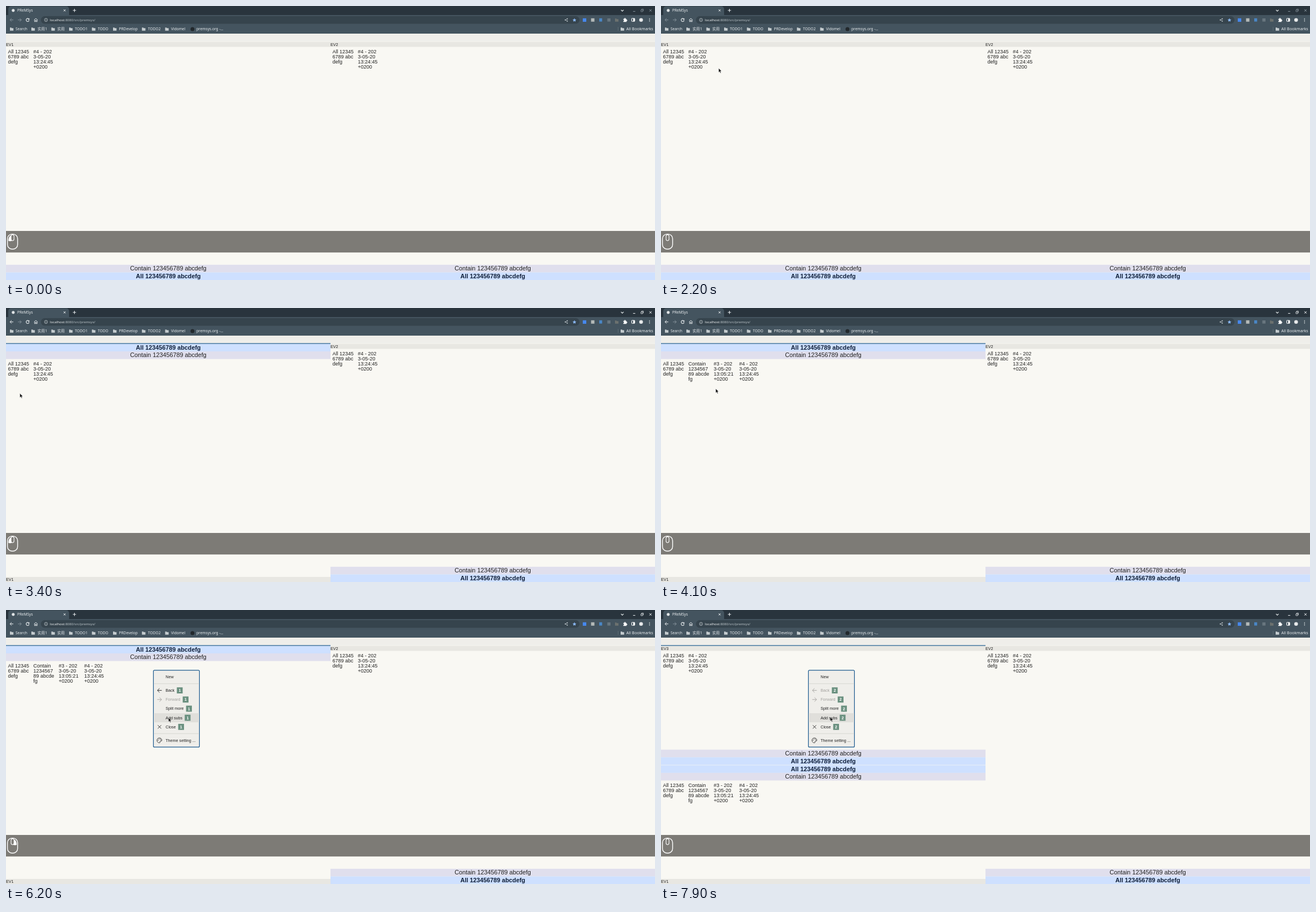
Write an HTML page with a canvas that moves like this. It is 1152 px wide and 486 px high and loops after 8000 ms.

```html
<!DOCTYPE html>
<html lang="en">
<head>
<meta charset="utf-8">
<title>PReMSys</title>
<style>
html, body { margin: 0; width: 100%; height: 100%; overflow: hidden; background: #f9f8f3; }
canvas { display: block; width: 100%; height: 100%; }
</style>
</head>
<body>
<canvas id="stage" width="1152" height="486"></canvas>
<script>
const ctx = document.getElementById('stage').getContext('2d');
const LOOP = 8000, STEP = 100;
const PAGE = '"Liberation Sans", Arial, sans-serif';
const UI = '"Noto Sans", "Noto Sans CJK SC", sans-serif';
const INK = '#222222', BLUE = '#1d5b8f', LIGHT = '#e9edef', DIM = '#84919a';

// Moments at which the state changes.
const AT = { release: 700, grab: 2800, open: 3200, load: 3900, rest: 4100,
  menu: 5200, menuRest: 6500, add: 6800, addRest: 7500 };

// Pointer path: time, x, y
const PATH = [
  [100, 1108, 7], [600, 620, 42], [1100, 328.7, 71.8], [1900, 150, 104],
  [2700, 23, 121], [2800, 23, 119], [2900, 23, 108.5], [3100, 23, 100],
  [3400, 24.7, 151.5], [3900, 40, 150], [4600, 240, 126], [5000, 266.7, 122],
  [5200, 261.5, 107], [5400, 263, 112], [6200, 288.5, 191], [6800, 289, 190.5],
  [7400, 294, 190], [7900, 300.3, 189.8]
];

const ITEMS = {
  all: ['All 12345', '6789 abc', 'defg'],
  contain: ['Contain', '1234567', '89 abcde', 'fg'],
  third: ['#3 - 202', '3-05-20', '13:05:21', '+0200'],
  fourth: ['#4 - 202', '3-05-20', '13:24:45', '+0200']
};
const SHORT = [ITEMS.all, ITEMS.fourth];
const LONG = [ITEMS.all, ITEMS.contain, ITEMS.third, ITEMS.fourth];

function rect(x, y, w, h, color) {
  ctx.fillStyle = color;
  ctx.fillRect(x, y, w, h);
}

function round(x, y, w, h, r, fill, stroke, width = 1) {
  ctx.beginPath();
  ctx.roundRect(x, y, w, h, r);
  if (fill) { ctx.fillStyle = fill; ctx.fill(); }
  if (stroke) { ctx.strokeStyle = stroke; ctx.lineWidth = width; ctx.stroke(); }
}

function disc(x, y, r, fill, stroke, width = 1) {
  round(x - r, y - r, 2 * r, 2 * r, r, fill, stroke, width);
}

function text(str, x, y, size, color = INK, font = PAGE, weight = 400, align = 'left') {
  ctx.font = `${weight} ${size}px ${font}`;
  ctx.textAlign = align;
  ctx.fillStyle = color;
  ctx.fillText(str, x, y);
}

// d uses coordinates relative to (x, y).
function path(d, x, y, { fill, stroke, width = 1 }) {
  const p = new Path2D(d);
  ctx.save();
  ctx.translate(x, y);
  if (fill) { ctx.fillStyle = fill; ctx.fill(p); }
  if (stroke) { ctx.strokeStyle = stroke; ctx.lineWidth = width; ctx.stroke(p); }
  ctx.restore();
}

function pointer(t) {
  const i = PATH.findIndex(p => p[0] >= t);
  if (i < 0) return PATH[PATH.length - 1].slice(1);
  if (i === 0) return PATH[0].slice(1);
  const [t0, x0, y0] = PATH[i - 1], [t1, x1, y1] = PATH[i];
  const k = (t - t0) / (t1 - t0);
  return [x0 + (x1 - x0) * k, y0 + (y1 - y0) * k];
}

function folder(x, y, color) {
  path('M0 -2.4 h2.4 l.8 .9 h3 v4.5 h-6.2z', x, y, { fill: color });
}

function drawBrowser(focused) {
  const nav = focused ? LIGHT : DIM;
  rect(0, 0, 1152, 17, '#29343d');
  rect(0, 16, 1152, 33, '#44545f');
  round(4, 0.5, 108, 18, [5, 5, 0, 0], '#44545f');

  disc(12.8, 7.8, 2.6, '#dfe3e5');
  text('PReMSys', 20, 10, 6.5, LIGHT, UI);
  path('M-1.7 -1.7 L1.7 1.7 M1.7 -1.7 L-1.7 1.7', 104, 7.8, { stroke: LIGHT });
  path('M-2.8 0 H2.8 M0 -2.8 V2.8', 121.5, 7.8, { stroke: LIGHT });
  path('M-2.3 -1.2 L0 1.2 L2.3 -1.2', 1094, 8, { stroke: LIGHT, width: 1.2 });
  path('M-2 2 H2', 1115, 7.6, { stroke: nav });
  path('M-2 -.6 h3.2 v3 h-3.2z M-.8 -.8 v-1.3 h3.2 v3 h-1', 1129, 7.6, { stroke: nav, width: .8 });
  path('M-2 -2 L2 2 M2 -2 L-2 2', 1144, 7.8, { stroke: nav });

  const arrow = 'M3 0 H-2.8 M0 -2.9 L-2.9 0 L0 2.9';
  path(arrow, 10, 24.7, { stroke: nav });
  path('M-3 0 H2.8 M0 -2.9 L2.9 0 L0 2.9', 24.3, 24.7, { stroke: DIM });
  path('M2.1 -1.7 A2.7 2.7 0 1 0 2.6 .7', 38.5, 24.8, { stroke: LIGHT, width: 1.1 });
  path('M3 -3.2 V-.3 H.2z', 38.5, 24.8, { fill: LIGHT });
  path('M-3.2 0 L0 -2.8 L3.2 0 M-2.2 -.5 V3 H-.8 V.8 H.8 V3 H2.2 V-.5', 53, 24.8, { stroke: LIGHT, width: .9 });

  round(62, 18, 956, 13.4, 6.7, '#36444d');
  disc(71, 24.7, 2.8, null, '#c2cace', .8);
  rect(70.6, 24.3, .8, 2, '#c2cace');
  rect(70.6, 22.9, .8, .8, '#c2cace');
  text('localhost', 78, 27, 6.1, '#eef1f2', UI);
  const host = ctx.measureText('localhost').width;
  text(':8080/src/premsys/', 78 + host, 27, 6.1, '#b9c2c7', UI);

  path('M1.8 -2 L-1.8 0 L1.8 2', 994.5, 24.7, { stroke: '#c2cace', width: .7 });
  [[996.3, 22.7], [992.7, 24.7], [996.3, 26.7]].forEach(([x, y]) => disc(x, y, 1, '#c2cace'));
  path('M0 -3.4 L1 -1.1 3.4 -.9 1.6 .7 2.1 3.1 0 1.8 -2.1 3.1 -1.6 .7 -3.4 -.9 -1 -1.1z',
    1009, 24.8, { fill: '#8ab8f5' });

  rect(1023.8, 21.8, 6.2, 6.2, '#4688ee');
  rect(1038.5, 21.8, 6, 6, '#b4b9b8');
  rect(1053, 21.8, 5.2, 5.8, '#4a86c5');
  rect(1067.4, 22, 5.6, 5.6, '#68767f');
  folder(1081, 24.7, '#6c716f');
  path('M-3 -1.8 h1.8 a1.1 1.1 0 1 1 2.1 0 h1.7 v1.7 a1.1 1.1 0 1 1 0 2.1 v1.6 h-5.6 v-1.8 a1 1 0 1 0 0 -1.9z',
    1098.8, 24.6, { fill: '#fff' });
  round(1110.5, 22, 5.5, 5.2, .5, null, '#fff', 1);
  rect(1113.3, 22, 2.7, 5.2, '#fff');
  disc(1127.3, 24.7, 3.3, '#e7e9ea');
  [-2.3, 0, 2.3].forEach(dy => disc(1142.3, 24.7 + dy, .75, LIGHT));

  const marks = [[7, 17, 'Search'], [45, 56, '实用1'], [80.5, 91, '实用'], [112, 122.3, 'TODO1'],
    [152.5, 163, 'TODO'], [190, 200.5, 'PRDevelop'], [241.3, 252, 'TODO2'], [282.5, 293, 'Vidomel']];
  for (const [fx, tx, name] of marks) {
    folder(fx, 40.7, '#c5cccf');
    text(name, tx, 43, 6.6, LIGHT, UI);
  }
  disc(331, 41, 3.5, '#22282c');
  text('premsys.org -…', 338, 43, 6.6, LIGHT, UI);
  rect(1086, 37, .7, 7, '#65737c');
  folder(1091, 40.7, '#c5cccf');
  text('All Bookmarks', 1101, 43, 7.1, LIGHT, UI);
}

function header(name, x, y) {
  rect(x, y, 576, 9, '#e8e7e2');
  text(name, x, y + 7.1, 7.2);
}

function row(kind, x, y) {
  const all = kind === 'All';
  rect(x, y, 576, 13.5, all ? '#cee0ff' : '#e0dfed');
  text(`${kind} 123456789 abcdefg`, x + 288, y + 10.4, 10.8, all ? '#10203a' : INK, PAGE, all ? 700 : 400, 'center');
}

function item(lines, x, y) {
  lines.forEach((line, i) => text(line, x + 3.5, y + 11.5 + i * 9, 9));
}

function list(items, x, y) {
  items.forEach((lines, i) => item(lines, x + i * 45.05, y));
}

// A view closed by its two ancestors at the bottom.
function view(name, x, bottom, items) {
  header(name, x, 63.5);
  list(items, x, 72.3);
  row('Contain', x, bottom - 27);
  row('All', x, bottom - 13.5);
}

// A view whose ancestors are stacked at the top.
function opened(y, items) {
  row('All', 0, y);
  row('Contain', 0, y + 13.5);
  list(items, 0, y + 27);
  header('EV1', 0, 477);
}

function drawPage(t, py) {
  rect(0, 49, 1152, 437, '#f9f8f3');
  rect(0, 49, 1152, 13.6, '#efeeea');
  view('EV2', 576, 486, SHORT);

  if (t < AT.grab) {
    view('EV1', 0, 486, SHORT);
  } else if (t < AT.open) {
    view('EV1', 0, 486, []);
    const y = 72.3 + py - 121.8;
    rect(0, Math.max(y, 63.5), 45, y + 58.8 - Math.max(y, 63.5), 'rgba(225,224,220,.6)');
    item(ITEMS.all, 0, y);
    item(ITEMS.fourth, 45.05, 72.3);
  } else if (t < AT.add) {
    opened(63.5, t < AT.load ? SHORT : LONG);
  } else {
    view('EV3', 0, 274.7, SHORT);
    opened(275.4, LONG);
  }
  if (t >= AT.grab) rect(0, 62.4, 576, 1.2, BLUE);
}

function drawMouse(t) {
  rect(0, 399, 1152, 38.2, '#7d7b76');
  const left = t < AT.release || (t >= AT.grab && t < AT.rest) || (t >= AT.add && t < AT.addRest);
  const right = t >= AT.menu && t < AT.menuRest;
  round(2.6, 404.6, 18, 26.6, 8, null, '#fff', 1.4);
  if (left || right) {
    ctx.save();
    ctx.translate(11.6, 0);
    if (right) ctx.scale(-1, 1);
    path('M-2.6 -5 Q-7.2 -3 -7.4 4.8 Q-4.6 6 -1.2 4.8 Q-3.4 2 -2.6 -5z', 0, 411.8, { fill: '#fff' });
    ctx.restore();
  }
  round(9, 405.6, 5.2, 10.6, 2.6, left || right ? '#7d7b76' : null, '#fff', 1.1);
}

function drawMenu(t, py) {
  const count = t < AT.add ? 1 : 2;
  round(261.6, 106.8, 81.8, 136.4, 2, '#efeeea', BLUE, 1.2);
  rect(262.2, 130.4, 80.6, .8, '#d2d1cd');
  rect(262.2, 218.8, 80.6, .8, '#d2d1cd');

  const back = 'M4 0 H-3.6 M0 -3.6 L-3.7 0 L0 3.6';
  const forward = 'M-4 0 H3.6 M0 -3.6 L3.7 0 L0 3.6';
  const cross = 'M-3 -3 L3 3 M3 -3 L-3 3';
  const entries = [
    ['New', 118.6], ['Back', 142.6, back, count === 2], ['Forward', 158.8, forward, true],
    ['Split more', 175], ['Add subs', 191.1], ['Close', 207.3, cross], ['Theme setting ...', 231.2]
  ];
  entries.forEach(([name, y, icon, off], i) => {
    const color = off ? '#a3a29f' : INK;
    if (Math.abs(py - y) < 8.1 && !off) rect(262.2, y - 8.1, 80.6, 16.2, '#e0dfdb');
    if (icon) path(icon, 272.5, y, { stroke: color, width: .9 });
    text(name, 283.2, y + 2.4, 7.2, color);
    if (i > 0 && i < 6) {
      const x = 283.2 + ctx.measureText(name).width + 4.1;
      rect(x, y - 5.4, 10.3, 10.8, '#6b9180');
      text(count, x + 5.15, y + 2.5, 7.2, '#fff', PAGE, 700, 'center');
    }
  });
  path('M.6 4.4 A4.4 4.4 0 1 1 4.4 -.3 Q4.3 1.6 2.4 1.5 Q.5 1.3 .9 2.6 Q1.6 4.2 .6 4.4z',
    272.3, 231.2, { stroke: INK, width: .8 });
  [[-2.4, .2], [-1.5, -2.1], [1, -2.5], [2.5, -.7]].forEach(([x, y]) => disc(272.3 + x, 231.2 + y, .65, INK));
}

function drawPointer(t, x, y) {
  if (t < 100) return;
  if (t >= AT.grab && t < AT.open) {
    const style = { stroke: '#fff', width: 2 };
    const arms = 'M-3.4 0 H3.4 M0 -3.4 V3.4';
    path(arms, x, y, style);
    path(arms, x, y, { stroke: INK, width: .9 });
    for (let i = 0; i < 4; i++) {
      ctx.save();
      ctx.translate(x, y);
      ctx.rotate(i * Math.PI / 2);
      path('M0 -4.4 L1.7 -2.3 H-1.7z', 0, 0, { fill: INK });
      ctx.restore();
    }
    return;
  }
  path('M0 0 V7.3 L1.7 5.8 L2.9 8.5 L4.1 8 L2.9 5.4 L5.1 5.2z', x, y,
    { fill: '#111', stroke: 'rgba(255,255,255,.75)', width: .5 });
}

function draw(t) {
  const [x, y] = pointer(t);
  drawPage(t, y);
  drawBrowser(t >= AT.grab);
  drawMouse(t);
  if (t >= AT.menu) drawMenu(t, y);
  drawPointer(t, x, y);
}

const start = performance.now();
function tick() {
  const ms = Math.max(0, performance.now() - start) % LOOP;
  draw(Math.floor(ms / STEP) * STEP);
  requestAnimationFrame(tick);
}
tick();
</script>
</body>
</html>
```
